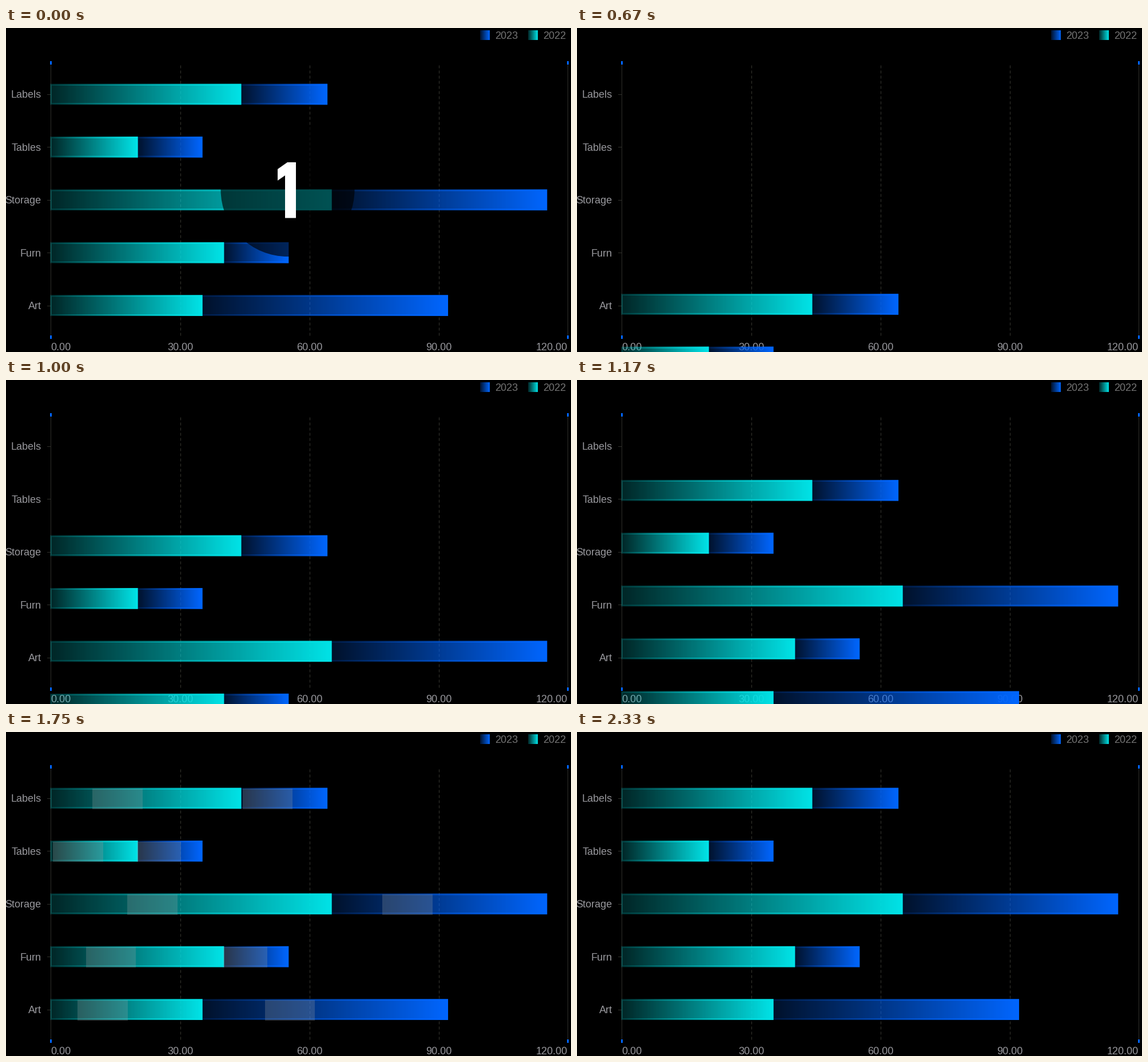
A matplotlib script for the animation above (3260 ms loop, 988 by 567 pixels).

```python
import numpy as np
import matplotlib.pyplot as plt
from matplotlib.animation import FuncAnimation
from matplotlib.patches import Circle, Polygon, Rectangle

W, H = 988, 567
DPI = 64
PX = 72 / DPI                     # points per pixel
LOOP, INTERVAL = 3260, 20         # ms

TEAL = (0, 228 / 255, 232 / 255)
BLUE = (0, 102 / 255, 1)
AXIS = "#2f2f2a"
GRID = "#363630"
LABEL = "#98989d"
LEGEND = "#747474"

X0, UNIT = 78.5, 226 / 30         # value axis
TOP, ROW, BAR_H = 99.1, 92.4, 33.8
EDGE = 1.5                        # half of the bar's stroke
FAINT = 0.17                      # opacity at a bar's left end
GLOW_W = 87.5
NAMES = ["Labels", "Tables", "Storage", "Furn", "Art"]
TEAL_VALUES = [44, 20, 65, 40, 35]
TOTALS = [64, 35, 115, 55, 92]

fig = plt.figure(figsize=(W / DPI, H / DPI), dpi=DPI, facecolor="black")
ax = fig.add_axes([0, 0, 1, 1])
ax.axis("off")


def box(x, y, w, h, color, **kw):
    return ax.add_patch(Rectangle((x, y), w, h, fc=color, lw=0,
                                  antialiased=False, **kw))


def label(x, y, text, color=LABEL, ha="left"):
    ax.text(x, y, text, color=color, ha=ha, va="baseline",
            family="Liberation Sans", size=18 * PX, zorder=2)


def cover(pixels, lo, hi):
    """Share of each pixel that lies between lo and hi."""
    return np.clip(np.minimum(pixels + 1, hi) - np.maximum(pixels, lo), 0, 1)


def bar_image(color, x0, x1, y, edge=EDGE, h=BAR_H):
    """Gradient fill with a stroke of the same gradient laid over its edge."""
    y1 = y + h
    cols = np.arange(np.floor(x0 - edge), np.ceil(x1 + edge))
    rows = np.arange(np.floor(y - edge), np.ceil(y1 + edge))

    def area(grow):
        return np.outer(cover(rows, y - grow, y1 + grow),
                        cover(cols, x0 - grow, x1 + grow))

    ramp = np.clip((cols + 0.5 - x0) / (x1 - x0), 0, 1)
    a = FAINT + (1 - FAINT) * ramp
    stroke = area(edge) - area(-edge)
    img = np.empty((len(rows), len(cols), 4))
    img[..., :3] = color
    img[..., 3] = 1 - (1 - a * area(0)) * (1 - a * stroke)
    return img, (cols[0], cols[-1] + 1, rows[-1] + 1, rows[0])


def place(img, extent, zorder):
    return ax.imshow(img, extent=extent, aspect="auto",
                     interpolation="nearest", zorder=zorder)


# Axes, grid and ticks
for x in (78, 982):
    box(x, 64, 1, 476, AXIS, zorder=1)
    for y in (58, 538):
        box(x - 1, y, 3, 6, BLUE, zorder=1.5)
for value in (30, 60, 90):
    x = X0 + value * UNIT
    ax.plot([x, x], [65, 539], color=GRID, lw=PX, ls=(0, (5, 4)),
            dash_capstyle="butt", zorder=1)
for value, x, ha in [(0, 78.5, "left"), (30, 304.5, "center"),
                     (60, 530.5, "center"), (90, 756.5, "center"),
                     (120, 982, "right")]:
    label(x, 563.5, f"{value:.2f}", ha=ha)
for i, name in enumerate(NAMES):
    y = 116 + i * ROW
    box(72, round(y), 6, 1, AXIS, zorder=1)
    label(61.5, y + 6.3, name, ha="right")

# Legend
for x, color, year in [(829, BLUE, "2023"), (913, TEAL, "2022")]:
    place(*bar_image(color, x, x + 17, 4, edge=0, h=17), zorder=2)
    label(x + 26, 19, year, LEGEND)

# Bars, each with its moving highlight; teal lies over the blue stroke
bars = []
for i, (part, total) in enumerate(zip(TEAL_VALUES, TOTALS)):
    y = TOP + i * ROW
    mid, end = X0 + part * UNIT, X0 + total * UNIT
    for x0, x1, color, z in [(mid, end, BLUE, 3), (X0, mid, TEAL, 4)]:
        art = place(*bar_image(color, x0, x1, y), zorder=z)
        glow = ax.add_patch(Rectangle((x0, y), 0, BAR_H + 2, fc="#a5a5a5",
                                      alpha=0.25, lw=0, zorder=5))
        bars.append((art, glow, color, x0, x1, y))

# Countdown badge
badge = [
    ax.add_patch(Circle((492.5, 283), 117, fc="black", alpha=0.64, lw=0,
                        zorder=6)),
    ax.add_patch(Polygon([(475, 247), (492, 235), (507, 235), (507, 332.5),
                          (488, 332.5), (488, 258), (475, 267)],
                         fc="white", lw=0, zorder=7)),
]

ax.set_xlim(0, W)
ax.set_ylim(H, 0)


def rise(step):
    """Distance of the bars below their place, or None while hidden."""
    if step < 4:
        return 0
    if step < 6:
        return None
    return max(0, 174 - 48.375 * (step - 12))


def sweep(step):
    """Progress of the highlight, or None when it is off."""
    if not 16 <= step < 28:
        return None
    if step in (20, 24):          # short stalls
        step -= 1
    return np.interp(step, [16, 21, 25, 27], [0.035, 0.383, 0.717, 0.884])


def update(k):
    t = k * INTERVAL + INTERVAL / 2
    step = int((t + 4) * 12 / 1000)
    drop, p = rise(step), sweep(step)
    for part in badge:
        part.set_visible(step < 1)
    for art, glow, color, x0, x1, y in bars:
        shown = drop is not None and y + drop - EDGE < H
        art.set_visible(shown)
        if shown:
            img, extent = bar_image(color, x0, x1, y + drop)
            art.set_data(img)
            art.set_extent(extent)
        glow.set_visible(p is not None)
        if p is not None:
            lead = x0 + p * (x1 - x0 + GLOW_W)
            left = max(x0, lead - GLOW_W)
            glow.set_x(left)
            glow.set_width(max(0, min(x1, lead) - left))
    return badge


anim = FuncAnimation(fig, update, frames=LOOP // INTERVAL, interval=INTERVAL,
                     repeat=True, repeat_delay=0, blit=False)
plt.show()
```
